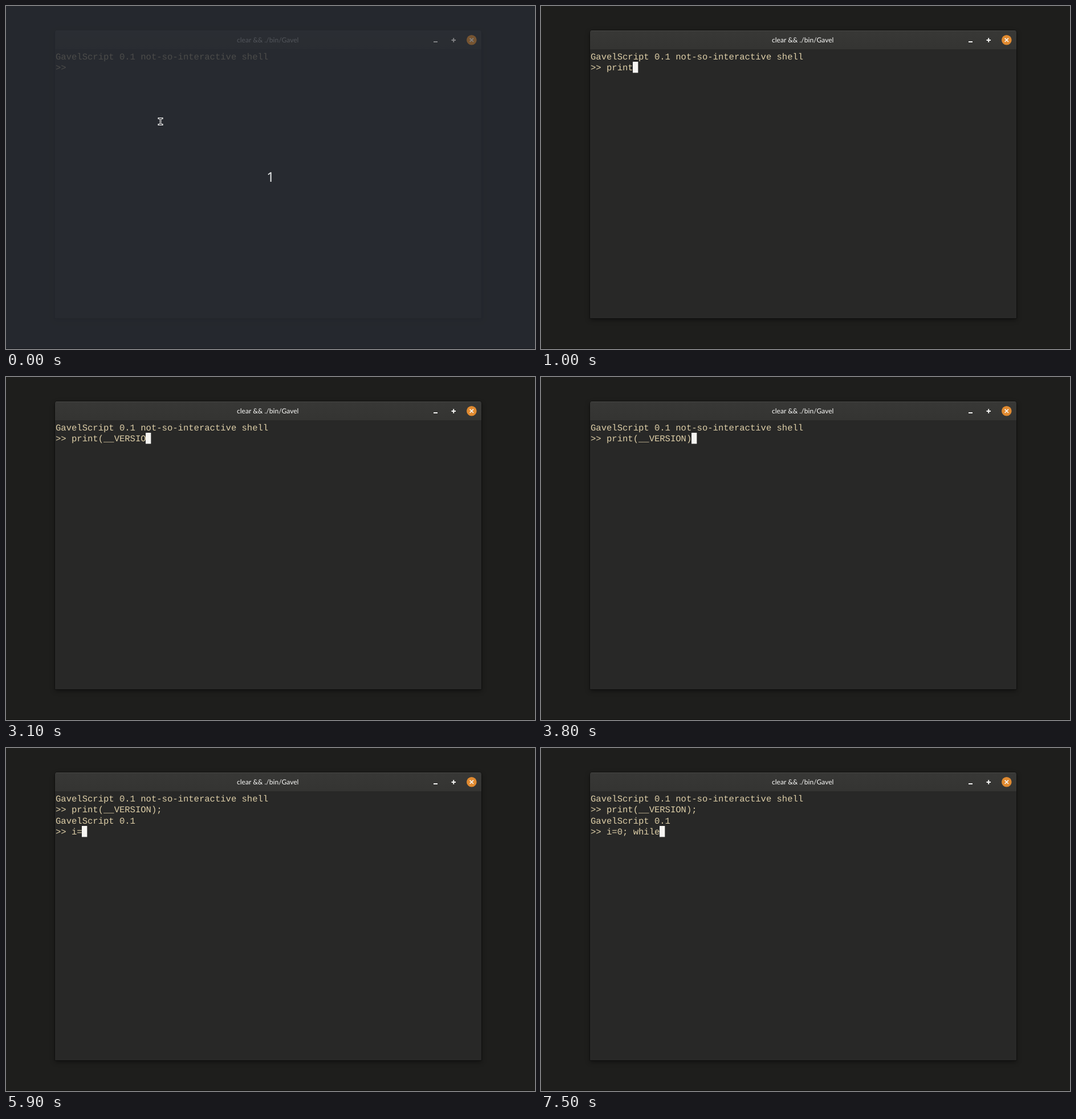
Write an HTML page that moves like this. It is 928x603 px and loops after 8000 ms.

```html
<!DOCTYPE html>
<html lang="en">
<head>
<meta charset="utf-8">
<title>Terminal session</title>
<style>
  html, body { margin: 0; width: 100%; height: 100%; overflow: hidden; background: #1e1e1c; }
  .window {
    position: absolute; left: 86px; top: 43px; width: 748px; height: 506px;
    box-sizing: border-box; overflow: hidden;
    background: #282827; border-radius: 4px 4px 1px 1px;
  }
  .shadow {
    position: absolute; left: 86px; top: 43px; width: 748px; height: 506px;
    border-radius: 4px 4px 1px 1px;
    box-shadow: 0 0 0 1px rgba(0, 0, 0, .35), 0 3px 9px rgba(0, 0, 0, .45);
  }
  .bar {
    height: 33px; background: linear-gradient(#383836, #343432);
    box-shadow: inset 0 1px #484846;
  }
  svg { position: absolute; left: 0; top: 0; }
  text { white-space: pre; text-rendering: geometricPrecision; }
  #term { font-family: "Source Code Pro", "Liberation Mono", monospace; fill: #decfa8; }
  #title { font-family: "Noto Sans Condensed", Lato, sans-serif; fill: #fafaf8; }
  #count { font: 23.5px "Noto Sans", "Open Sans", sans-serif; fill: #e6e7e8; text-anchor: middle; }
</style>
</head>
<body>
<div class="shadow"></div>
<div class="window"><div class="bar"></div></div>
<svg width="928" height="603" viewBox="0 0 928 603">
  <text id="title" x="405" y="64.4">clear &amp;&amp; ./bin/Gavel</text>
  <g id="term"></g>
  <rect id="caret" width="9.33" fill="#f6f5f2"/>
  <rect id="dim" width="928" height="603" fill="#272b32" fill-opacity=".8"/>
  <g id="controls" fill="none" stroke="#f4f4f2" stroke-width="2">
    <path d="M750 63h7M781.5 60h7.5M785.2 56.2v7.5"/>
    <circle cx="816.8" cy="59.8" r="8.8" fill="#e08a30" stroke="none"/>
    <path d="M813.6 56.6l6.4 6.4M820 56.6l-6.4 6.4" stroke-width="1.7"/>
  </g>
  <g id="intro">
    <g fill="none">
      <path d="M268 197.5h6M268 208.5h6M271 197.5v11" stroke="#f0f0f0" stroke-width="3" stroke-linecap="square"/>
      <path d="M268 197.5h6M268 208.5h6M271 197.5v11" stroke="#1c1e22" stroke-width="1"/>
    </g>
    <text id="count" x="464" y="309.4">1</text>
  </g>
  <path d="M0 602.5h928" stroke="#000" stroke-opacity=".35"/>
</svg>
<script>
const LOOP = 8000, CELL = 28 / 3, ROW = 19.5, LEFT = 87, BASE = 93.7;
const START = 300, ENTER = 4100, BLINK_OFF = 4600, BLINK_ON = 5200;
const BANNER = 'GavelScript 0.1 not-so-interactive shell';
const first = {
  text: 'print(__VERSION);',
  keys: [500, 600, 700, 800, 1000, 1500, 1700, 2000, 2400, 2500, 2600, 2900, 3000, 3100, 3500, 3800, 4000]
};
const second = {
  text: 'i=0; while',
  keys: [5500, 5900, 6000, 6300, 6500, 6800, 6900, 7100, 7300, 7500]
};

const $ = id => document.getElementById(id);
const show = (el, on) => el.setAttribute('visibility', on ? 'visible' : 'hidden');

// Picks the font size at which a text has its natural width.
function fit(box, text, width) {
  box.style.fontSize = '100px';
  box.style.fontSize = 100 * width / text.getComputedTextLength() + 'px';
}

const rows = [0, 1, 2, 3].map(i => {
  const row = document.createElementNS('http://www.w3.org/2000/svg', 'text');
  row.setAttribute('x', LEFT);
  row.setAttribute('y', BASE + i * ROW);
  return $('term').appendChild(row);
});
rows[0].textContent = BANNER;
fit($('term'), rows[0], BANNER.length * CELL);
fit($('title'), $('title'), 108.5);

function setRow(i, text) {
  if (rows[i].textContent !== text) rows[i].textContent = text;
}

const typed = (line, t) => line.text.slice(0, line.keys.filter(k => k <= t).length);

function draw(t) {
  const intro = t < START, entered = t >= ENTER;
  const a = typed(first, t), b = typed(second, t);
  setRow(1, '>> ' + a);
  setRow(2, entered ? 'GavelScript 0.1' : '');
  setRow(3, entered ? '>> ' + b : '');

  const caret = $('caret'), col = 3 + (entered ? b : a).length;
  caret.setAttribute('x', Math.floor(LEFT + col * CELL + .01));
  caret.setAttribute('y', entered ? 137 : 98);
  caret.setAttribute('height', 19.4);
  show(caret, !intro && !(t >= BLINK_OFF && t < BLINK_ON));

  show($('dim'), intro);
  show($('intro'), intro);
  $('controls').setAttribute('opacity', intro ? .42 : 1);
}

function tick() {
  draw(performance.now() % LOOP);
  requestAnimationFrame(tick);
}
tick();
</script>
</body>
</html>
```
